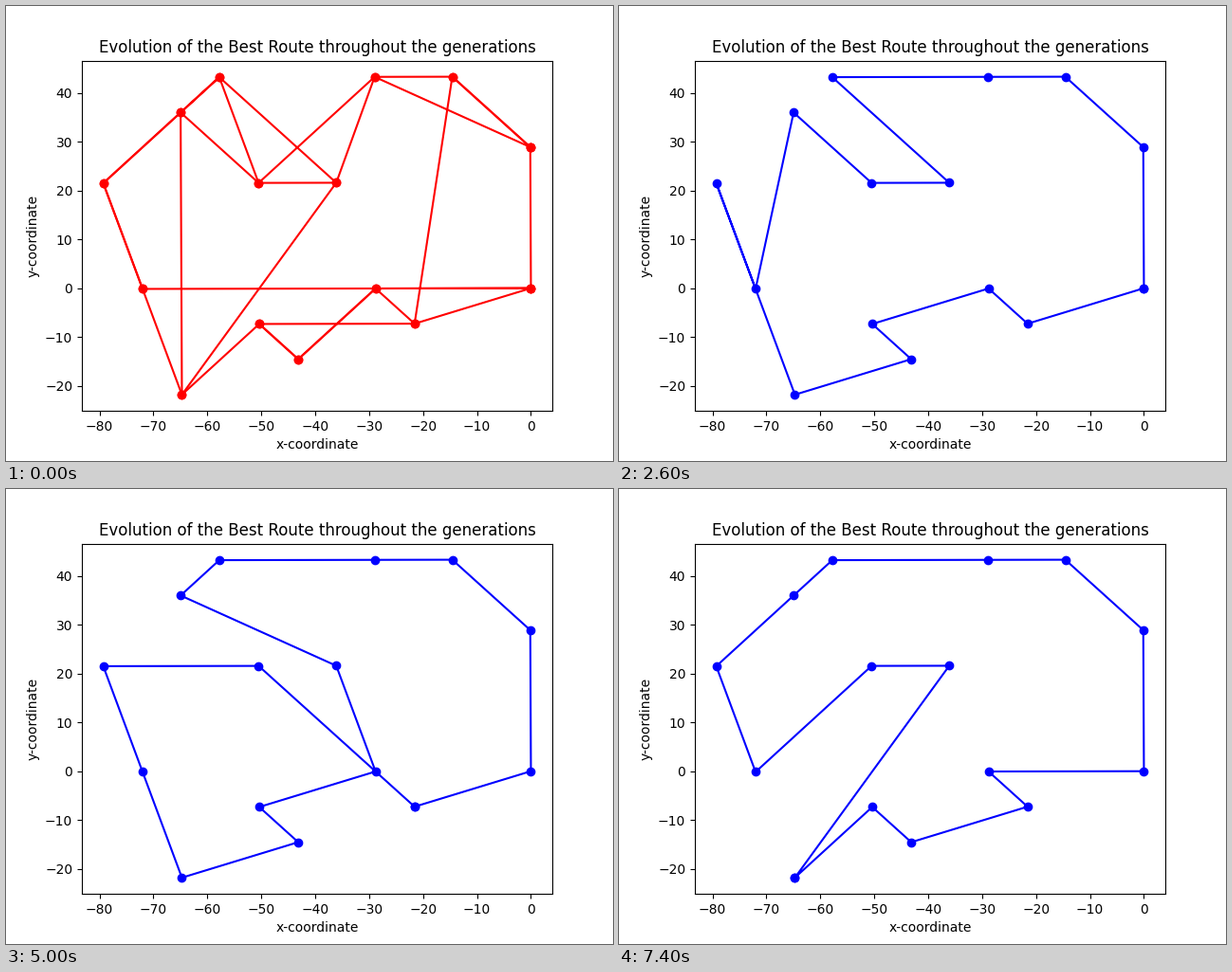
A matplotlib script for the animation above (8000 ms loop, 640 px wide and 480 px high).

```python
import numpy as np
import matplotlib.pyplot as plt
from matplotlib.animation import FuncAnimation

STEP = 100  # ms per frame
LOOP = 8000

# Cities sit on a regular grid that is very slightly skewed
EAST = np.array([7.2, 0.015])
NORTH = np.array([-0.03, 7.23])
GRID = dict(
    a=(0, 0), b=(-4, 0), c=(-11, 3), d=(-2, 6), e=(-9, -3),
    f=(-4, 6), g=(-10, 0), h=(-5, 3), i=(-7, -1), j=(-7, 3),
    k=(0, 4), l=(-9, 5), m=(-3, -1), n=(-8, 6), o=(-6, -2),
)

# Two parent routes are shown together before the search starts
PARENTS = ("amboiegcnljhfdk", "kdmiobagclehnjf")

# Start time in ms and visiting order of each best route
BEST = {
    100: "aboimdkhnjegclf",
    1600: "hjgeoibmlnfdakc",
    2600: "akdfnhjlgceoibm",
    2700: "ibmoakdfnhjlgce",
    3100: "oakdfnliegcjhbm",
    4600: "iegcomakdfnljhb",
    5000: "mjcgeoibhlnfdka",
    6700: "dkambhcgeoijlnf",
    7300: "egcjhlnfdkabmoi",
    7400: "ehjgclnfdkabmoi",
}


def tour(order):
    """x and y of a closed route."""
    stops = [GRID[city] for city in order + order[0]]
    return np.array([col * EAST + row * NORTH for col, row in stops]).T


fig, ax = plt.subplots(figsize=(6.4, 4.8), dpi=100)
red_lines = [ax.plot(*tour(order), "ro-")[0] for order in PARENTS]
blue_line, = ax.plot([], [], "bo-")
ax.set(title="Evolution of the Best Route throughout the generations",
       xlabel="x-coordinate", ylabel="y-coordinate",
       xlim=(-83.256, 3.965), ylim=(-25.163, 46.654))


def update(frame):
    started = [start for start in BEST if start <= frame * STEP]
    for line in red_lines:
        line.set_visible(not started)
    blue_line.set_visible(bool(started))
    if started:
        blue_line.set_data(*tour(BEST[started[-1]]))
    return [*red_lines, blue_line]


anim = FuncAnimation(fig, update, frames=LOOP // STEP, interval=STEP,
                     init_func=lambda: update(0), repeat=True, repeat_delay=0)
plt.show()
```
